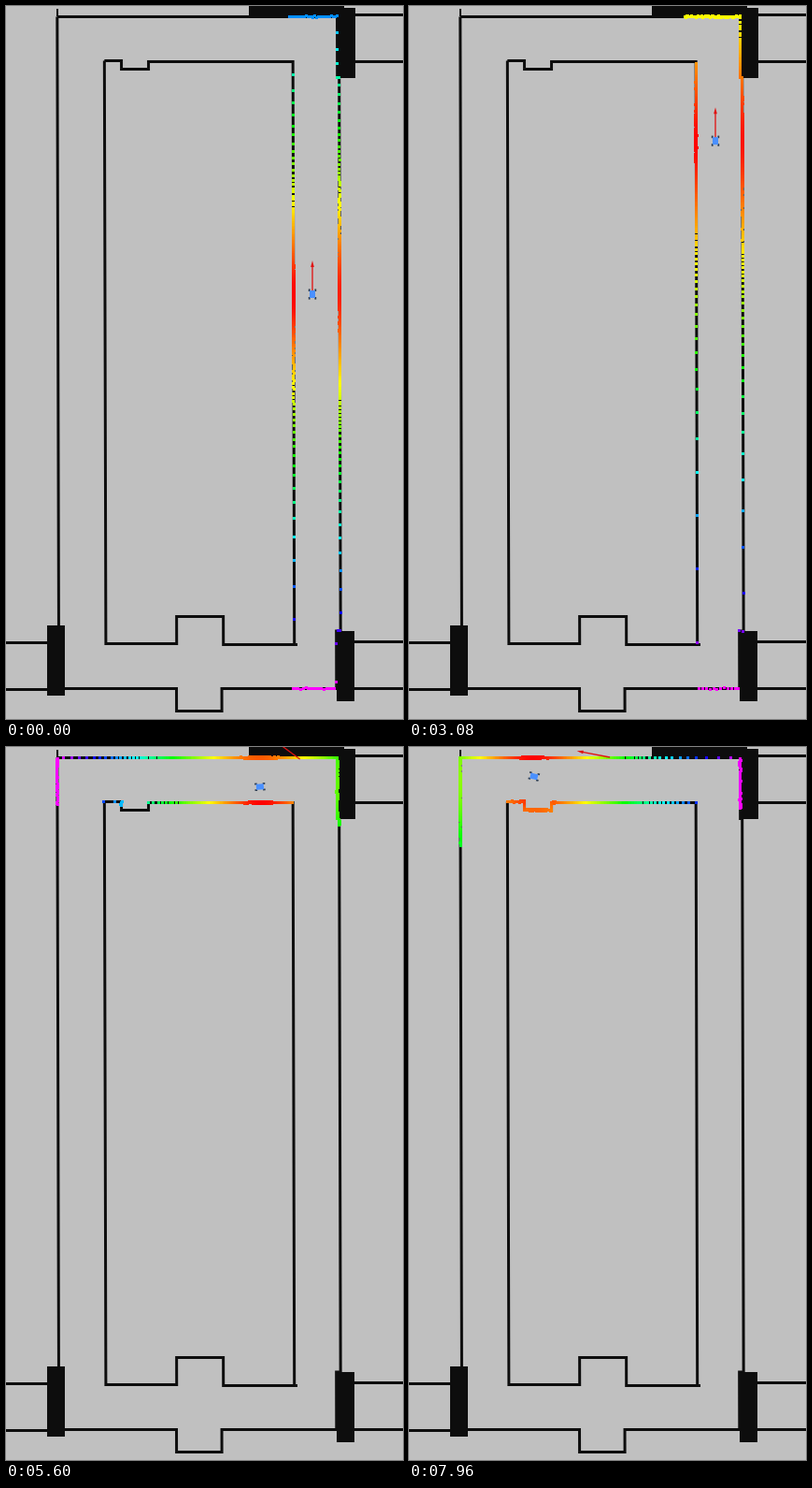
Animation of 425 by 762 pixels, one loop 8000 ms. Source, as an HTML page with a canvas:

```html
<!DOCTYPE html>
<html lang="en">
<head>
<meta charset="utf-8">
<title>Corridor scan</title>
<style>
  html, body { margin: 0; width: 100%; height: 100%; overflow: hidden; background: #c0c0c0; }
  canvas { display: block; }
</style>
</head>
<body>
<canvas id="stage" width="425" height="762"></canvas>
<script>
const ctx = document.getElementById('stage').getContext('2d');
const LOOP = 8000, STEP = 40, RAYS = 960, DOT = 3;
const SPEED = 58.5, RAMP = 0.28;

// Walls are alternating horizontal and vertical runs; the whole map leans slightly right.
function trace(x, y, ...runs) {
  const lean = () => [x + y / 400, y];
  const points = [lean()];
  runs.forEach((run, i) => {
    if (i % 2) y += run; else x += run;
    points.push(lean());
  });
  return points;
}

const island = trace(105.2, 58.5, 18.2, 9, 29, -8, 154.6, 623, -76, -30, -50, 29, -75.8, -623);
const boundary = trace(54.8, 11.5, 299.7, 65, 2, 591.5, -4.5, 61.5, -122.8, 24, -48.5, -24, -125.9, -718);
const walls = [island, boundary];
const segments = walls.flatMap(path =>
  path.slice(1).map(([x, y], i) => [...path[i], x - path[i][0], y - path[i][1]]));

// Straight up, a quarter turn to the left, then a shallow bow along the top corridor.
function robotAt(t) {
  const x = 328, y = 308, turnY = 70, radius = 30;
  const travelled = SPEED * (t - RAMP * (1 - Math.exp(-t / RAMP)));
  const turned = travelled - (y - turnY);
  if (turned < 0) return [x, y - travelled];
  const angle = turned / radius;
  if (angle < Math.PI / 2) {
    return [x - radius * (1 - Math.cos(angle)), turnY - radius * Math.sin(angle)];
  }
  const along = turned - radius * Math.PI / 2;
  return [x - radius - along, turnY - radius + along * (116 - along) / 920];
}

// The arrow drifts away from the robot in the turn and swings out over the top edge.
function arrowAt(t) {
  const u = (t - 4.3) / 3.66;
  if (u < 0) return [...robotAt(t), 0];
  const v = 1 - u;
  return [
    329 - 114 * u * u,
    78 * v * v + 11 * u - 26 * Math.sin(Math.PI * u),
    79 * (1 - v ** 2.6)
  ];
}

function noise(a, b) {
  const s = Math.sin(a * 12.9898 + b * 78.233) * 43758.5453;
  return s - Math.floor(s) - 0.5;
}

function castRay(x, y, dx, dy) {
  let nearest = Infinity;
  for (const [ax, ay, ex, ey] of segments) {
    const det = dx * ey - dy * ex;
    const range = ((ax - x) * ey - (ay - y) * ex) / det;
    const along = ((ax - x) * dy - (ay - y) * dx) / det;
    if (range > 0 && range < nearest && along >= 0 && along <= 1) nearest = range;
  }
  return nearest;
}

function drawMap() {
  ctx.fillStyle = '#c0c0c0';
  ctx.fillRect(0, 0, 425, 762);
  ctx.strokeStyle = ctx.fillStyle = '#0d0d0d';
  ctx.lineWidth = 3;
  for (const path of walls) {
    ctx.beginPath();
    path.forEach(p => ctx.lineTo(...p));
    ctx.stroke();
  }
  for (const y of [679, 729]) {
    ctx.fillRect(0, y, 45, 3);
    ctx.fillRect(372, y - 1, 53, 3);
  }
  for (const y of [8, 58]) ctx.fillRect(372, y, 53, 3);
  ctx.fillRect(54, 3, 2, 8);
  ctx.fillRect(308, 681, 4, 3);
  ctx.fillRect(260, 0, 102, 11);
  for (const [x, y] of [[355, 2], [44, 662], [354, 668]]) ctx.fillRect(x, y, 19, 75);
}

function drawScan(x, y, heading, tick) {
  const hits = [];
  for (let i = 0; i < RAYS; i++) {
    const angle = heading + (i + 0.5) * 2 * Math.PI / RAYS;
    const dx = Math.cos(angle), dy = Math.sin(angle);
    const range = castRay(x, y, dx, dy);
    if (range === Infinity) continue;
    const shown = range + noise(i, tick) * 1.4;
    hits.push({ range, px: x + dx * shown, py: y + dy * shown });
  }
  const ranges = hits.map(h => h.range);
  const min = Math.min(...ranges), max = Math.max(...ranges);
  for (const { range, px, py } of hits) {
    ctx.fillStyle = `hsl(${300 * (range - min) / (max - min)} 100% 50%)`;
    ctx.fillRect(Math.round(px - DOT / 2), Math.round(py - DOT / 2), DOT, DOT);
  }
}

function drawArrow(x, y, degrees) {
  ctx.save();
  ctx.translate(x, y);
  ctx.rotate(-degrees * Math.PI / 180);
  ctx.fillStyle = '#e01010';
  ctx.fillRect(-0.65, -30, 1.3, 30);
  ctx.beginPath();
  ctx.moveTo(0, -36);
  ctx.lineTo(1.8, -29);
  ctx.lineTo(-1.8, -29);
  ctx.fill();
  ctx.restore();
}

function drawRobot(x, y, heading) {
  ctx.save();
  ctx.translate(x, y);
  ctx.rotate(heading);
  ctx.fillStyle = '#2c3c50';
  for (const sx of [-1, 1]) for (const sy of [-1, 1]) {
    ctx.fillRect(sx * 4.3 - 1.3, sy * 3.3 - 0.9, 2.6, 1.8);
  }
  ctx.fillStyle = '#4a90ff';
  ctx.fillRect(-4, -3, 8, 6);
  ctx.restore();
}

function draw(now) {
  const tick = Math.floor(now % LOOP / STEP), t = tick * STEP / 1000;
  const [x, y] = robotAt(t), [aheadX, aheadY] = robotAt(t + 0.05);
  const heading = Math.atan2(aheadY - y, aheadX - x);
  drawMap();
  drawScan(x, y, heading, tick);
  drawArrow(...arrowAt(t));
  drawRobot(x, y, heading);
}

const start = performance.now();
function frame() {
  draw(performance.now() - start);
  requestAnimationFrame(frame);
}
frame();
</script>
</body>
</html>
```
